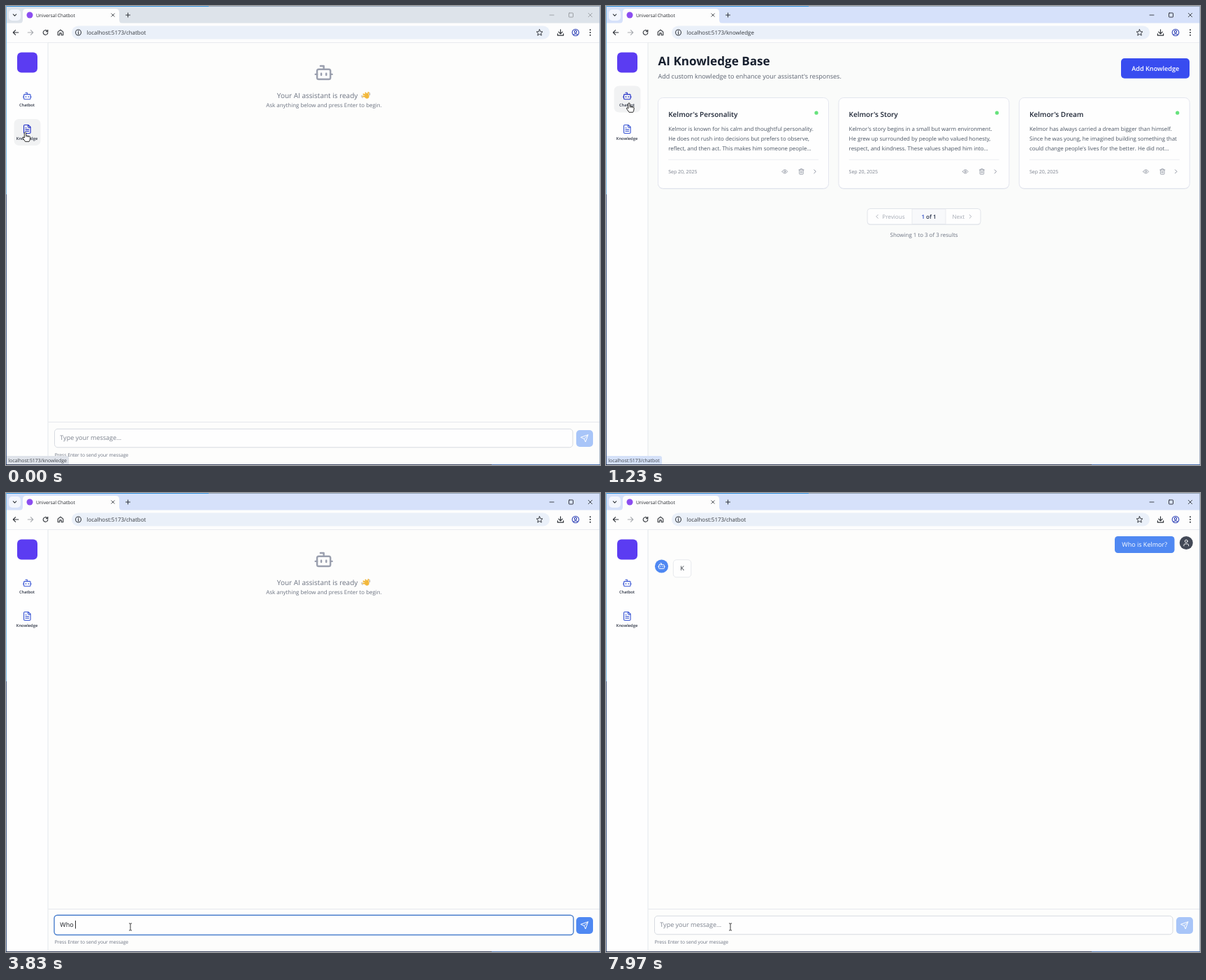
These frames come from a looping animation (850x658 px, 8 s). An HTML page:

```html
<!DOCTYPE html>
<html lang="en">
<head>
<meta charset="utf-8">
<title>Universal Chatbot</title>
<style>
  html, body { margin: 0; width: 100%; height: 100%; overflow: hidden; background: #fdfdfc; }
  svg { display: block; width: 850px; height: 658px; }
  text { font-family: "Open Sans", "Noto Sans", sans-serif; text-rendering: geometricPrecision; white-space: pre; }
  .nav { color: #3a56d4; }
  .nav rect.tile { fill: none; }
  .nav.hover { color: #2230c8; }
  .nav.hover rect.tile { fill: #f1f2f3; }
</style>
</head>
<body>
<svg id="stage" viewBox="0 0 850 658" xmlns="http://www.w3.org/2000/svg"></svg>
<script>
const LOOP = 8000;
const NAME = 'Kelmor';
const QUESTION = `Who is ${NAME}?`;

const ICONS = {
  bot: '<path d="M12 8V4H8M2 14h2M20 14h2M15 13v2M9 13v2"/><rect x="4" y="8" width="16" height="12" rx="2"/>',
  file: '<path d="M15 2H6a2 2 0 0 0-2 2v16a2 2 0 0 0 2 2h12a2 2 0 0 0 2-2V7ZM14 2v4a2 2 0 0 0 2 2h4M10 9H8M16 13H8M16 17H8"/>',
  send: '<path d="m22 2-7 20-4-9-9-4ZM22 2 11 13"/>',
  user: '<path d="M19 21v-2a4 4 0 0 0-4-4H9a4 4 0 0 0-4 4v2"/><circle cx="12" cy="7" r="4"/>',
  eye: '<path d="M2 12q10-14 20 0q-10 14-20 0"/><circle cx="12" cy="12" r="3"/>',
  trash: '<path d="M3 6h18M19 6v14a2 2 0 0 1-2 2H7a2 2 0 0 1-2-2V6M8 6V4a2 2 0 0 1 2-2h4a2 2 0 0 1 2 2v2M10 11v6M14 11v6"/>',
  right: '<path d="m9 18 6-6-6-6"/>',
  left: '<path d="m15 18-6-6 6-6"/>',
  down: '<path d="m6 9 6 6 6-6"/>',
  back: '<path d="M21 12H3m8-8-8 8 8 8"/>',
  forward: '<path d="M3 12h18m-8-8 8 8-8 8"/>',
  reload: '<path d="M20 12a8 8 0 1 1-2.5-5.8L20 9M20 3v6h-6"/>',
  home: '<path d="m3 10 9-7 9 7v11h-6v-7H9v7H3Z"/>',
  info: '<circle cx="12" cy="12" r="9"/><path d="M12 11v6M12 7v1"/>',
  star: '<path d="m12 2 3 7 7 .6-5.3 4.7 1.6 7.2-6.3-3.8-6.3 3.8 1.6-7.2L2 9.6 9 9Z"/>',
  download: '<path d="M12 3v12m-6-5 6 6 6-6M3 16v5h18v-5"/>',
  profile: '<circle cx="12" cy="12" r="10"/><circle cx="12" cy="9.5" r="3.5"/><path d="M5.5 19q6.5-6 13 0"/>',
  close: '<path d="m4 4 16 16M20 4 4 20"/>',
  plus: '<path d="M12 3v18M3 12h18"/>',
  minus: '<path d="M3 12h18"/>',
  square: '<rect x="3" y="3" width="18" height="18" rx="2"/>'
};

const rect = (x, y, w, h, fill, r = 0, extra = '') =>
  `<rect x="${x}" y="${y}" width="${w}" height="${h}" rx="${r}" fill="${fill}" ${extra}/>`;
const circle = (x, y, r, fill) => `<circle cx="${x}" cy="${y}" r="${r}" fill="${fill}"/>`;
const text = (x, y, size, fill, value, extra = '') =>
  `<text x="${x}" y="${y}" font-size="${size}" fill="${fill}" ${extra}>${value}</text>`;
const icon = (name, x, y, size, color, width = 2) =>
  `<g transform="translate(${x - size / 2} ${y - size / 2}) scale(${size / 24})" fill="none" stroke="${color}"
    stroke-width="${width}" stroke-linecap="round" stroke-linejoin="round">${ICONS[name]}</g>`;
const group = (id, body, extra = '') => `<g id="${id}" ${extra}>${body}</g>`;
const stroke = (color, width = 1) => `stroke="${color}" stroke-width="${width}"`;
const weight = w => `font-weight="${w}"`;
const MIDDLE = 'text-anchor="middle" ';

function browser() {
  const ink = '#30343a';
  return rect(0, 0, 850, 658, '#fdfdfc')
    + rect(0, 0, 850, 30, '#d6e1fa', 0, 'id="titlebar"')
    + rect(4, 5, 17, 16, '#f3f6fd', 5) + icon('down', 12.5, 13, 9, ink, 2.8)
    + '<path d="M19 25q5 0 5-5V9q0-5 5-5h128q5 0 5 5v11q0 5 5 5Z" fill="#fdfdfd"/>'
    + circle(34, 13, 4.5, '#8b4df0')
    + text(43, 15.7, 6.7, '#24272c', 'Universal Chatbot')
    + icon('close', 153, 13, 6.5, ink, 3) + icon('plus', 174.5, 13, 8, ink, 3)
    + group('controls', icon('minus', 781, 13, 8, 'currentColor', 2.5)
      + icon('square', 808.5, 13, 8, 'currentColor', 2.7) + icon('close', 836, 13, 8, 'currentColor', 2.5))
    + rect(0, 24.5, 850, 27.5, '#fdfdfd')
    + rect(94, 28.5, 684, 19, '#eaf0f9', 9.5)
    + icon('back', 14, 38, 10, ink, 2.6) + icon('forward', 35, 38, 10, '#a9acb0', 2.6)
    + icon('reload', 56.5, 38, 10, ink, 2.6) + icon('home', 78, 38, 10, ink, 2.6)
    + icon('info', 103.5, 38, 10.5, ink, 2.3)
    + text(115.5, 40.9, 7.95, '#33373d', '', 'id="url"')
    + icon('star', 763.5, 38, 10.5, ink, 2.2) + icon('download', 793.5, 38, 11, ink, 2.6)
    + icon('profile', 815, 38, 11.5, '#3346b8', 2.3)
    + [34.3, 38, 41.7].map(y => circle(836, y, 1, ink)).join('')
    + rect(1, 52, 848, 0.8, '#e4e7eb');
}

function navItem(id, name, y, label) {
  return group(id, rect(11.5, y - 14.5, 38, 38, 'none', 7, 'class="tile"')
    + icon(name, 30.3, y, 14.3, 'currentColor', 1.9)
    + text(30, y + 15.3, 5.75, '#2b3242', label, MIDDLE + weight(600)), 'class="nav"');
}

function sidebar() {
  return rect(1, 52.8, 59, 605, '#fefefe') + rect(59.6, 52.8, 0.9, 605, '#e2e5ea')
    + rect(16, 66.5, 29, 29, '#5b3cf2', 6)
    + navItem('navChat', 'bot', 129, 'Chatbot')
    + navItem('navKnow', 'file', 176.5, 'Knowledge');
}

function wavingHand() {
  const finger = (x1, y1, x2, y2) =>
    `<path d="M${x1} ${y1}L${x2} ${y2}" stroke="#f2b83c" stroke-width="2" stroke-linecap="round"/>`;
  return '<ellipse cx="516.5" cy="129" rx="3.2" ry="3.8" fill="#f2b83c"/>'
    + finger(515, 128, 511.5, 126.5) + finger(515, 130, 511, 129.5)
    + finger(516, 127, 514.5, 124.5) + finger(518, 127, 518.5, 124)
    + '<path d="M509 128q-.5 2.5 1.5 4M520 124q1 1.5.5 4" fill="none" stroke="#9a8f86" stroke-width=".8"/>';
}

function chatPage() {
  const welcome = icon('bot', 454.7, 95.5, 28.6, '#9a9fae')
    + text(387.8, 131.7, 10, '#6b7280', 'Your AI assistant is ready') + wavingHand()
    + text(455, 144.9, 7.93, '#6b7280', 'Ask anything below and press Enter to begin.', MIDDLE);
  const sent = rect(728, 62, 85.5, 24, '#4f88f2', 4.5)
    + text(770.7, 77.3, 9, '#fff', QUESTION, MIDDLE)
    + circle(830.3, 71.5, 9.5, '#434956') + icon('user', 830.3, 71.5, 11.5, '#fff');
  const avatar = circle(79.5, 105, 9.6, '#4f88f2') + icon('bot', 79.5, 104.7, 11.5, '#fff');
  const bubble = w => rect(96.3, 95.8, w, 25, '#fefefe', 4.5, stroke('#e5e7eb', 0.9));
  const dots = [0, 1, 2].map(i => circle(107 + i * 7, 108.3, 2.3, '#9ca3af')).join('');
  const composer = rect(60.5, 596, 789, 0.9, '#e2e5ea')
    + rect(69.5, 606.3, 741.5, 26.5, '#fefefe', 4.5, 'id="field"')
    + text(77.3, 622.1, 9, '#7b818d', 'Type your message...', 'id="placeholder"')
    + text(77.3, 622.1, 9, '#15181e', '', 'id="typed"')
    + rect(0, 613, 0.9, 11.5, '#111', 0, 'id="caret"')
    + rect(816, 608, 24, 24, '#a8c5f8', 5, 'id="sendButton"') + icon('send', 827.8, 620, 12, '#fff')
    + text(69.7, 645.6, 6.7, '#6b7280', 'Press Enter to send your message');
  return group('welcome', welcome) + group('sent', sent + avatar)
    + group('loading', bubble(36) + group('dots', dots))
    + group('reply', bubble(25.5) + text(109, 111.4, 9, '#2a303b', NAME[0], MIDDLE)) + composer;
}

function card(x, title, lines) {
  const soft = '#8b919e';
  return rect(x, 132.5, 244, 130, '#e6e8ee', 7)
    + rect(x, 131.5, 244, 130, '#fefefe', 7, stroke('#e1e4ee', 0.9))
    + text(x + 14.7, 158.5, 10, '#1c2434', `${NAME}'s ${title}`, weight(600))
    + circle(x + 226.5, 153.2, 2.6, '#66e27c')
    + lines.map((line, i) => text(x + 14.7, 179.3 + i * 13.6, 7.9, '#4b5563', line)).join('')
    + rect(x + 14.7, 219.8, 215, 0.8, '#e9ebf0')
    + text(x + 14.7, 240, 7, '#7b818e', 'Sep 20, 2025')
    + icon('eye', x + 181.3, 237.3, 9.5, soft) + icon('trash', x + 205, 237.3, 9.5, soft)
    + icon('right', x + 224.5, 237.3, 10, soft, 2.3);
}

function knowledgePage() {
  const pale = '#a4a9b3';
  return rect(60.5, 52.8, 789, 605, '#fafbfa')
    + text(74.5, 84.7, 17.1, '#18202f', 'AI Knowledge Base', weight(700))
    + text(74.5, 103.6, 9.03, '#5c6371', "Add custom knowledge to enhance your assistant's responses.")
    + rect(737, 75.8, 98, 28.7, '#eceef6', 5) + rect(737, 75, 98, 28.7, '#384cf0', 5)
    + text(786.3, 93, 9.15, '#fff', 'Add Knowledge', MIDDLE + weight(600))
    + card(74.5, 'Personality', [`${NAME} is known for his calm and thoughtful personality.`,
      'He does not rush into decisions but prefers to observe,', 'reflect, and then act. This makes him someone people...'])
    + card(332.9, 'Story', [`${NAME}'s story begins in a small but warm environment.`,
      'He grew up surrounded by people who valued honesty,', 'respect, and kindness. These values shaped him into...'])
    + card(591.2, 'Dream', [`${NAME} has always carried a dream bigger than himself.`,
      'Since he was young, he imagined building something that', "could change people's lives for the better. He did not..."])
    + rect(374, 291.5, 162, 22.5, '#e9ebef', 4)
    + rect(374, 290.5, 162, 22.5, '#fefefe', 4, stroke('#dfe2e8', 0.9))
    + rect(438, 291, 48, 21.5, '#f8f9fb', 0, stroke('#e3e6eb', 0.7))
    + icon('left', 388, 301.8, 10, pale) + text(395.3, 304.6, 8.1, pale, 'Previous', weight(500))
    + text(462, 304.6, 8, '#27314a', '<tspan fill="#2947c4">1</tspan> of 1', MIDDLE + weight(600))
    + text(495.5, 304.6, 8.1, pale, 'Next', weight(500)) + icon('right', 521.5, 301.8, 10, pale)
    + text(455, 331.4, 7.93, '#6b7280', 'Showing 1 to 3 of 3 results', MIDDLE);
}

function desktopEdge() {
  return rect(0, 0, 290, 1, '#2f8fdc') + rect(290, 0, 560, 1, '#93a3b5')
    + rect(0, 0, 0.9, 270, '#6fb4e4') + rect(0, 270, 0.9, 388, '#3d5583')
    + rect(849.3, 1, 0.7, 657, '#8f9fb8')
    + rect(0, 657.1, 695, 0.9, '#28324f') + rect(695, 657.1, 155, 0.9, '#3a64a8');
}

function cursors() {
  const outline = 'fill="#fff" stroke="#111" stroke-width=".9" stroke-linejoin="round"';
  return group('hand', `<path d="M-1.2 .8q1.2-1.8 2.4 0v4l5 1q1.2.4 1 2l-.7 4-1 1.5h-5.5l-3.5-5q-.6-1.5 1-1.3l1.3 1Z" ${outline}/>
      <path d="M1.2 4.8v2M3.2 5.2v2M5.2 5.8v1.7" stroke="#111" stroke-width=".6"/>`)
    + group('arrow', `<path d="M0 0v9.5l2.2-2 1.6 3.6 1.6-.7-1.6-3.5h3Z" ${outline}/>`)
    + group('beam', '<path d="M-2-5h1.5L0-4.5.5-5H2M0-4.5v9M-2 5h1.5L0 4.5.5 5H2" fill="none" stroke="#222" stroke-width=".9"/>');
}

document.getElementById('stage').innerHTML = browser() + group('chat', chatPage())
  + group('knowledge', knowledgePage()) + sidebar()
  + group('status', '<path id="statusBox"/>' + text(3.3, 653.5, 6.88, '#3c4046', '', 'id="statusText"'))
  + desktopEdge() + cursors();

const el = {};
document.querySelectorAll('[id]').forEach(node => el[node.id] = node);
const show = (node, on) => { node.style.display = on ? '' : 'none'; };
const set = (node, attrs) => { for (const key in attrs) node.setAttribute(key, attrs[key]); };
const between = (t, from, to) => t >= from && t < to;

// Times in ms
const OPEN_KNOWLEDGE = 300, OPEN_CHAT = 1260, FOCUS = 3200, SEND = 6330, ANSWER = 7860;
const KEY_TIMES = [3520, 3600, 3690, 3790, 4080, 4180, 4330, 4620, 4740, 4890, 5000, 5110, 5230, 5520];
const POINTER = [[0, 27.5, 181], [400, 33, 182], [850, 33, 182], [1150, 33, 139], [1480, 33, 139], [2070, 178, 622]];

function pointerAt(t) {
  const next = POINTER.findIndex(step => step[0] > t);
  if (next < 0) return POINTER[POINTER.length - 1].slice(1);
  const [t0, x0, y0] = POINTER[next - 1], [t1, x1, y1] = POINTER[next];
  const p = (t - t0) / (t1 - t0), k = p * p * (3 - 2 * p);
  return [x0 + (x1 - x0) * k, y0 + (y1 - y0) * k];
}

function drawPointer(t) {
  const [x, y] = pointerAt(t);
  const overChat = between(x, 11, 50) && between(y, 114, 153);
  const overKnow = between(x, 11, 50) && between(y, 162, 200);
  const kind = y > 606 && x > 69 ? 'beam' : (overChat || overKnow) && t < OPEN_CHAT ? 'hand' : 'arrow';
  for (const name of ['hand', 'arrow', 'beam']) {
    show(el[name], name === kind);
    set(el[name], { transform: `translate(${x} ${y})` });
  }
  el.navChat.classList.toggle('hover', overChat);
  el.navKnow.classList.toggle('hover', overKnow);

  const chatLink = y < 155 || t > OPEN_CHAT;
  show(el.status, t < 1720);
  el.statusText.textContent = 'localhost:5173/' + (chatLink ? 'chatbot' : 'knowledge');
  set(el.statusBox, {
    d: `M1 645h${chatLink ? 76 : 86}q3 0 3 3v9H1Z`,
    fill: t < OPEN_KNOWLEDGE ? '#dfe3ea' : '#d5e1f8'
  });
}

function drawComposer(t) {
  const focused = between(t, FOCUS, SEND);
  const count = focused ? KEY_TIMES.filter(time => time <= t).length : 0;
  set(el.field, focused
    ? { x: 69, y: 605.3, width: 743, height: 28.2, stroke: '#4a7fcd', 'stroke-width': 1.4 }
    : { x: 69.5, y: 606.3, width: 741.5, height: 26.5, stroke: '#d3d7de', 'stroke-width': 0.9 });
  show(el.placeholder, count === 0);
  el.typed.textContent = QUESTION.slice(0, count);
  const sinceKey = t - (count ? KEY_TIMES[count - 1] : FOCUS);
  show(el.caret, focused && sinceKey % 1000 < 500);
  set(el.caret, { x: 77.3 + (count ? el.typed.getComputedTextLength() : 0) });
  set(el.sendButton, { fill: count ? '#4f88f2' : '#a8c5f8' });
}

function render(t) {
  const active = t >= OPEN_KNOWLEDGE;
  const onKnowledge = between(t, OPEN_KNOWLEDGE, OPEN_CHAT);
  set(el.titlebar, { fill: active ? '#d6e1fa' : '#dde3ea' });
  set(el.controls, { color: active ? '#25282d' : '#96999e' });
  el.url.textContent = 'localhost:5173/' + (onKnowledge ? 'knowledge' : 'chatbot');
  show(el.chat, !onKnowledge);
  show(el.knowledge, onKnowledge);

  drawComposer(t);
  show(el.welcome, t < SEND);
  show(el.sent, t >= SEND);
  show(el.loading, between(t, SEND, ANSWER));
  show(el.reply, t >= ANSWER);
  [...el.dots.children].forEach((dot, i) =>
    set(dot, { cy: 108.3 - 2 * Math.abs(Math.sin((t - SEND - i * 120) / 1000 * Math.PI)) }));
  drawPointer(t);
}

const start = performance.now();
function tick() {
  render((performance.now() - start) % LOOP);
  requestAnimationFrame(tick);
}
tick();
</script>
</body>
</html>
```
